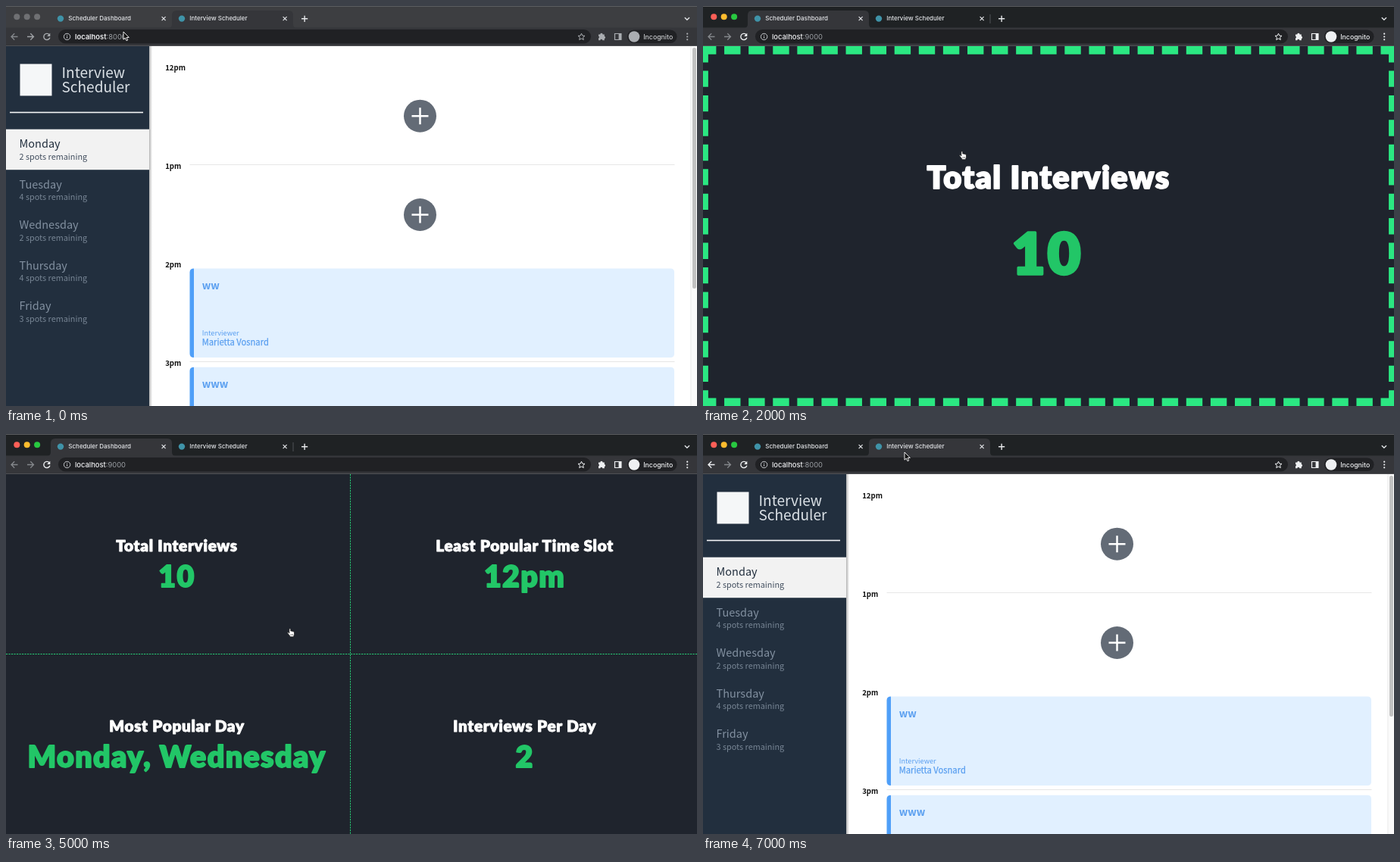
Write an HTML page that moves like this. It is 912x528 px and loops after 8000 ms.

```html
<!DOCTYPE html>
<html lang="en">
<head>
<meta charset="utf-8">
<title>Interview scheduler walkthrough</title>
<style>
html, body { margin: 0; width: 100%; height: 100%; overflow: hidden; background: #1f242d; }
svg { display: block; width: 912px; height: 528px; }
.ui { font-family: Inter, Roboto, sans-serif; font-weight: 500; }
.page { font-family: "Noto Sans CJK JP", "Noto Sans CJK SC", "Open Sans", sans-serif; }
.board { font-family: Lato, "Open Sans", sans-serif; font-weight: 900; text-anchor: middle;
  stroke-linejoin: round; paint-order: stroke; }
.board text { letter-spacing: .034em; }
</style>
</head>
<body>
<svg id="stage" viewBox="0 0 912 528" xmlns="http://www.w3.org/2000/svg"></svg>
<script>
const stage = document.getElementById('stage');
const GREEN = '#22c667', EDGE = '#2be882', NAVY = '#222f3e', BLUE = '#5a9ff0';

const rect = (x, y, w, h, fill, r = 0) =>
  `<rect x="${x}" y="${y}" width="${w}" height="${h}" rx="${r}" fill="${fill}"/>`;
const dot = (x, y, r, fill) => `<circle cx="${x}" cy="${y}" r="${r}" fill="${fill}"/>`;
const path = (d, color, w = 1.3, more = '') =>
  `<path d="${d}" fill="none" stroke="${color}" stroke-width="${w}" ${more}/>`;
const text = (x, y, size, fill, str, more = '') =>
  `<text x="${x}" y="${y}" font-size="${size}" fill="${fill}" ${more}>${str}</text>`;

const cards = [
  { x: 225.5, y: 155.3, title: 'Total Interviews', value: '10' },
  { x: 684.5, y: 155.3, title: 'Least Popular Time Slot', value: '12pm' },
  { x: 225.5, y: 393.3, title: 'Most Popular Day', value: 'Monday, Wednesday' },
  { x: 684.5, y: 393.3, title: 'Interviews Per Day', value: '2' }
];

const days = [['Monday', 2], ['Tuesday', 4], ['Wednesday', 2], ['Thursday', 4], ['Friday', 3]];

// One scene per second of the loop.
const scenes = [
  { tab: 1, idle: true, arrow: [155, 34] },
  { tab: 0, hand: [343, 197] },
  { tab: 0, focus: cards[0], hand: [343, 197] },
  { tab: 0, hand: [628, 392] },
  { tab: 0, hand: [502, 327] },
  { tab: 0, hand: [376, 262] },
  { tab: 0, focus: cards[1], hand: [604, 212] },
  { tab: 1, back: true, arrow: [266, 24] }
];

function tabs({ tab, idle }) {
  const x = 59 + tab * 160;
  const lights = idle ? ['#6f7073', '#6f7073', '#6f7073'] : ['#fe5f57', '#febc2e', '#28c840'];
  let s = rect(0, 0, 912, 30, idle ? '#3d3e41' : '#1f2224') + rect(0, 0, 912, 1, '#5b5d60');
  s += `<path d="M${x - 5} 29q5 0 5-5V12q0-6 6-6h148q6 0 6 6v12q0 5 5 5z" fill="#35363a"/>`;
  lights.forEach((c, i) => s += dot(14.3 + i * 13.4, 14.3, 4, c));
  ['Scheduler Dashboard', 'Interview Scheduler'].forEach((name, i) => {
    const left = 72 + i * 160;
    s += dot(left, 16.6, 4.2, '#3f93a8') + text(left + 10.3, 19.4, 8, '#e4e6e9', name);
    s += path(`M${left + 133.6} 14.2l5 5m0-5l-5 5`, '#dfe1e4', 1.2);
  });
  if (!tab) s += rect(378.5, 11, 1, 12, '#505257');
  s += path('M390 16.8h8.2m-4.1-4.1v8.2', '#e6e8ea', 1.4);
  return s + path('M895.8 15.2l3.1 3 3.1-3', '#dfe1e4', 1.4);
}

function toolbar({ tab, idle, back }) {
  const ink = idle ? '#aaadb1' : '#eef0f2', dim = '#85888c';
  let s = rect(0, 28.5, 912, 24.5, '#35363a') + rect(0, 52.2, 912, .8, '#55575b');
  s += rect(69, 31, 703, 18.5, '#202124', 9.2) + rect(820, 31.5, 65.5, 17.5, '#202124', 8.7);
  s += path('M15.5 40.5H7m4.2-4.3L7 40.5l4.2 4.3', back ? ink : dim, 1.3);
  s += path('M28 40.5h8.5m-4.2-4.3l4.2 4.3-4.2 4.3', idle ? '#a0a3a7' : dim, 1.3);
  s += path('M57.2 38a4.1 4.1 0 1 0 .7 3.6', ink, 1.4);
  s += `<path d="M58.3 35.8v4.2h-4.2z" fill="${ink}"/>`;
  s += path('M84.8 40.5a4.2 4.2 0 1 1-8.4 0a4.2 4.2 0 1 1 8.4 0M80.6 40v2.7M80.6 38v1.1', '#c5c8cc', 1);
  s += text(91, 43.8, 9.4, '#f1f2f4',
    `localhost<tspan fill="#9b9fa4" font-weight="400">:${tab ? 8000 : 9000}</tspan>`,
    `font-weight="${idle ? 600 : 450}"`);
  s += path('M759.5 36.2l1.3 2.9 3.2.3-2.4 2.1.7 3.1-2.8-1.6-2.8 1.6.7-3.1-2.4-2.1 3.2-.3z', ink, 1);
  s += `<path d="M782 37.5h2.2a1.7 1.7 0 0 1 3.4 0h2.2v2.4a1.7 1.7 0 0 1 0 3.3v2h-2.5a1.5 1.5 0 0 0-3 0H782v-2.6a1.5 1.5 0 0 0 0-2.8z" fill="${ink}"/>`;
  s += path('M803.5 36.5h8.4v8h-8.4z', ink, 1.2) + rect(808.6, 36.5, 3.5, 8, ink);
  s += dot(829, 40.5, 7.3, ink) + text(841.2, 43.7, 8.75, idle ? '#c5c7ca' : '#eef0f2', 'Incognito');
  for (const y of [36.7, 40.5, 44.3]) s += dot(899.2, y, 1.1, ink);
  return s;
}

function dashboard(focus) {
  const label = (x, y, size, color, str) =>
    text(x, y, size, color, str, `stroke="${color}" stroke-width="${size * .045}"`);
  let s = rect(0, 53, 912, 475, '#1f242d');
  if (focus) {
    const across = 'stroke-dasharray="21.4 10.69"', down = 'stroke-dasharray="21.4 11.04"';
    s += path('M-4 58.4H916M-4 522.8H916', EDGE, 10.8, across);
    s += path('M1.5 53V528.5M910.5 53V528.5', EDGE, 10.8, down);
    s += label(456, 240.7, 41.4, '#fff', focus.title) + label(454.5, 354, 76, GREEN, focus.value);
  } else {
    s += path('M0 290.5H912M454.5 53V528', '#27cf76', 1, 'stroke-dasharray="2.2 1.3"');
    for (const c of cards)
      s += label(c.x, c.y, 20.7, '#fff', c.title) + label(c.x, c.y + 46.2, 39.4, GREEN, c.value);
  }
  return `<g class="board">${s}</g>`;
}

function sidebar() {
  let s = rect(189, 53, 4, 475, 'url(#shade)') + rect(0, 53, 189, 475, NAVY);
  s += rect(18.5, 76.5, 42, 42, '#f5f7f8');
  s += text(73.5, 95, 19.05, '#dce2e7', 'Interview', 'font-weight="300"');
  s += text(73.5, 114.3, 19.05, '#dce2e7', 'Scheduler', 'font-weight="300"');
  s += rect(5, 139.7, 176, 1.6, '#f5f6f7') + rect(0, 162.7, 189, 53.5, '#f2f2f2');
  days.forEach(([name, spots], i) => {
    const y = 187.4 + i * 53.5;
    s += text(17.5, y, 14.5, i ? '#8290a0' : NAVY, name);
    s += text(17.5, y + 15.4, 10.85, i ? '#778594' : '#445060', spots + ' spots remaining', 'font-weight="300"');
  });
  return s;
}

function booking(y, name) {
  return `<path d="M248 ${y}h629q5 0 5 5v107.5q0 5-5 5H248z" fill="#e1f0ff"/>
    <path d="M248 ${y}v117.5q-5.5 0-5.5-5V${y + 5}q0-5 5.5-5z" fill="#4f9ff8"/>` +
    text(258.7, y + 27.6, 13.4, BLUE, name, 'font-weight="600"') +
    text(258.7, y + 88.6, 9.2, BLUE, 'Interviewer', 'font-weight="300"') +
    text(258.7, y + 101.4, 11.2, BLUE, 'Marietta Vosnard', `stroke="${BLUE}" stroke-width=".25"`);
}

function schedule() {
  let s = rect(0, 53, 912, 475, '#fff') + sidebar();
  ['12pm', '1pm', '2pm', '3pm'].forEach((hour, i) =>
    s += text(210.2, 84.6 + i * 130, 9.6, '#111', hour, 'font-weight="700"'));
  for (const y of [209, 469]) s += rect(242.5, y, 640, 1, '#e6e6e6');
  for (const y of [145.2, 275.5])
    s += dot(546.5, y, 21.5, '#636b76') + path(`M535.5 ${y}h22m-11-11v22`, '#fff', 2.5);
  s += booking(346.5, 'ww') + booking(476.8, 'www');
  s += rect(904, 53, 8, 475, '#fafafa') + rect(903.5, 53, .8, 475, '#e6e6e6');
  return `<g class="page">${s + rect(906, 55, 5, 318, '#c1c1c1', 2.5)}</g>`;
}

function pointer({ arrow, hand }) {
  const [x, y] = arrow || hand;
  const shape = arrow
    ? '<path d="M0 0v10.2l2.3-2.1 1.7 3.7 1.7-.8-1.6-3.5h3.2z" fill="#111" stroke="#fff" stroke-width=".9"/>'
    : `<path d="M-2.2 1V-4.2q0-1 1-1t1 1v2.3q1.2-.5 1.6.3 1.2-.4 1.6.4 1.5-.2 1.5 1.2V2.5q0 1.2-.8 2v1.2h-5V4.6L-4.3.9q-.6-1.2.5-1.4.7 0 1.6 1.5z"
        fill="#fff" stroke="#111" stroke-width=".7"/>
       <path d="M-.1 2v2M1.4 2v2M2.8 2v2" stroke="#333" stroke-width=".5"/>`;
  return `<g transform="translate(${x} ${y})">${shape}</g>`;
}

function draw(scene) {
  stage.innerHTML = `<defs><linearGradient id="shade">
      <stop stop-color="#000" stop-opacity=".3"/><stop offset="1" stop-color="#000" stop-opacity="0"/>
    </linearGradient></defs>` +
    (scene.tab ? schedule() : dashboard(scene.focus)) +
    `<g class="ui">${tabs(scene) + toolbar(scene)}</g>` + pointer(scene);
}

let shown = -1;
const start = performance.now();
function tick() {
  const step = Math.floor((performance.now() - start) / 1000) % scenes.length;
  if (step !== shown) draw(scenes[shown = step]);
  requestAnimationFrame(tick);
}
tick();
</script>
</body>
</html>
```
